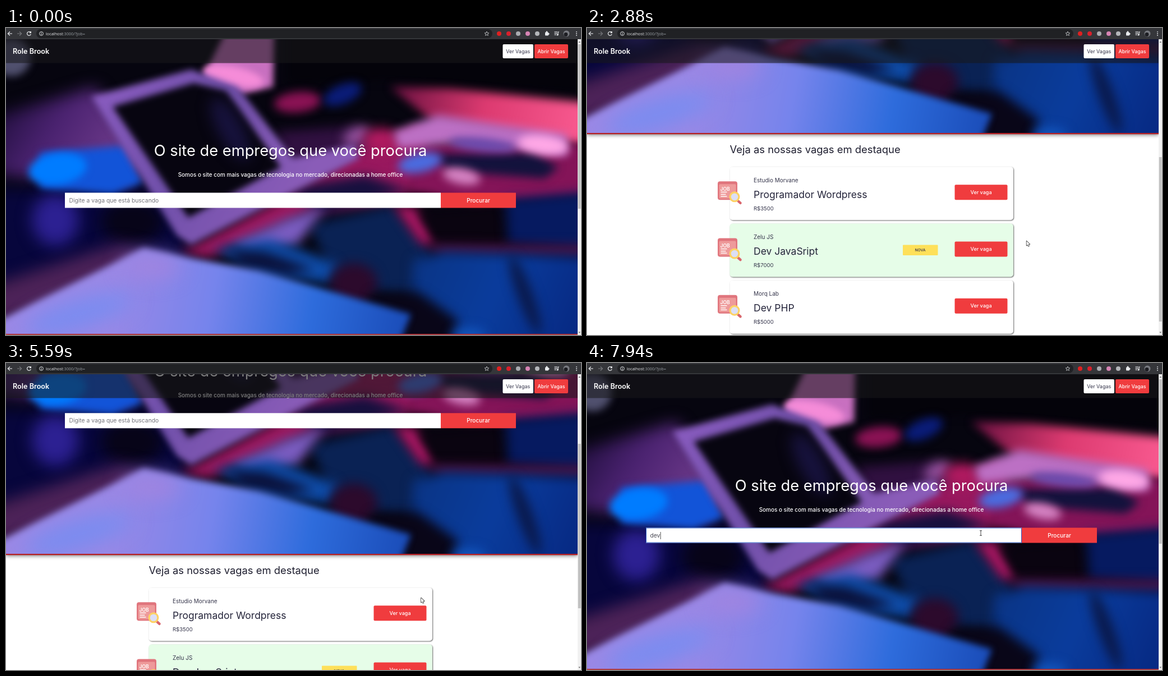
Animation, 1025 px wide and 547 px high, one loop 8000 ms. Source, as an HTML page with a canvas:

```html
<!DOCTYPE html>
<html lang="pt-BR">
<head>
<meta charset="utf-8">
<title>Vagas</title>
<style>
html, body { margin: 0; width: 100%; height: 100%; overflow: hidden; background: #fff; }
canvas { display: block; width: 1025px; height: 547px; }
</style>
</head>
<body>
<canvas id="stage" width="1025" height="547"></canvas>
<script>
const W = 1025, H = 547, LOOP = 8000, BAR = 20, PAGE_W = 1019, HERO_END = 544.5;
const RED = '#f03c3e', DARK_RED = [189, 26, 28], INK = '#24243a';
const SANS = 'Inter, sans-serif';
const ctx = document.getElementById('stage').getContext('2d');
const photo = paintPhoto();

// Pose tracks: [time, ...values]
const POINTER = [
  [70, 972, 508], [220, 925, 455], [460, 866, 400], [905, 866, 400],
  [1160, 856, 318], [1550, 842, 304], [1850, 842, 304], [2020, 822, 322],
  [2329, 783.5, 379.5], [3250, 783.5, 379.5], [3440, 735, 275], [3575, 716, 262],
  [3760, 735, 276], [4043, 780, 375], [4500, 875, 437], [4900, 740, 378],
  [4978, 684, 366], [5130, 690, 381], [5350, 740, 418.5], [5900, 740, 418.5],
  [6300, 742, 350], [6600, 724, 312], [6700, 724, 312], [6701, 716, 316],
  [7080, 716, 316], [7081, 720, 314.5], [7930, 720, 314.5], [7931, 702, 303]
];
const SCROLL = [
  [2420, 0], [2485, 70], [2563, 161.5], [2780, 161.5], [2797, 250],
  [2875, 358], [3095, 358], [3108, 385.5], [5280, 385.5], [5520, 250],
  [5757, 116], [5990, 40], [6150, 0]
];
const JOBS = [
  { firm: 'Estudio Morvane', title: 'Programador Wordpress', pay: 'R$3500', hover: [3430, 3780] },
  { firm: 'Zelu JS', title: 'Dev JavaSript', pay: 'R$7000', hover: [4940, 5120], fresh: true },
  { firm: 'Morq Lab', title: 'Dev PHP', pay: 'R$5000', hover: null }
];

function track(keys, t) {
  if (t <= keys[0][0]) return keys[0].slice(1);
  const i = keys.findIndex(k => k[0] > t);
  if (i < 0) return keys[keys.length - 1].slice(1);
  const a = keys[i - 1], b = keys[i], p = (t - a[0]) / (b[0] - a[0]);
  return a.slice(1).map((v, n) => v + (b[n + 1] - v) * p);
}

function rect(color, x, y, w, h, r = 0, c = ctx) {
  c.fillStyle = color;
  c.beginPath();
  c.roundRect(x, y, w, h, r);
  c.fill();
}

function disc(color, x, y, r) {
  ctx.fillStyle = color;
  ctx.beginPath();
  ctx.arc(x, y, r, 0, 7);
  ctx.fill();
}

function line(color, width, ...p) {
  ctx.strokeStyle = color;
  ctx.lineWidth = width;
  ctx.beginPath();
  for (let i = 0; i < p.length; i += 2) ctx.lineTo(p[i], p[i + 1]);
  ctx.stroke();
}

// y is the middle of the capitals
function text(str, x, y, size, color, weight = 400, align = 'left', family = SANS) {
  ctx.font = `${weight} ${size}px ${family}`;
  ctx.textAlign = align;
  ctx.fillStyle = color;
  ctx.fillText(str, x, y + size * 0.36);
  return ctx.measureText(str).width;
}

function paintPhoto() {
  const cv = document.createElement('canvas');
  cv.width = PAGE_W;
  cv.height = H;
  const c = cv.getContext('2d');
  const soft = n => { c.filter = `blur(${n}px)`; };
  const poly = (color, ...p) => {
    c.fillStyle = color;
    c.beginPath();
    for (let i = 0; i < p.length; i += 2) c.lineTo(p[i], p[i + 1]);
    c.fill();
  };
  const blob = (color, x, y, rx, ry, turn = 0) => {
    c.fillStyle = color;
    c.beginPath();
    c.ellipse(x, y, rx, ry, turn, 0, 7);
    c.fill();
  };
  const fade = (x0, y0, x1, y1, ...colors) => {
    const g = c.createLinearGradient(x0, y0, x1, y1);
    colors.forEach((k, i) => g.addColorStop(i / (colors.length - 1), k));
    return g;
  };
  c.fillStyle = '#06050f';
  c.fillRect(0, 0, PAGE_W, H);

  // left side
  soft(14);
  poly(fade(0, 100, 190, 220, '#1c0c38', '#4a2270', '#6a3888'), -30, 160, 160, 105, 240, 230, 220, 290, -30, 260);
  poly('#07063c', -30, 285, 300, 285, 330, 420, -30, 470);
  blob('#2c2092', 88, 342, 42, 46);
  blob('#070418', 225, 345, 55, 42);
  poly('#4c2258', -30, 460, 200, 385, 260, 400, 60, 510, -30, 530);
  soft(7);
  blob('#50506e', 10, 52, 34, 34);
  poly('#1254d8', 60, 222, 210, 210, 245, 275, 190, 296, 60, 285);
  blob('#007cff', 92, 251, 52, 28, -0.15);

  // middle ground
  soft(10);
  poly('#301040', 480, 185, 620, 175, 690, 240, 520, 270);
  poly('#98185e', 310, 400, 500, 300, 630, 215, 740, 175, 760, 260, 690, 315, 540, 330, 360, 410);
  poly('#16103e', 500, 285, 640, 262, 720, 290, 560, 335);
  poly('#0a2254', 540, 350, 690, 315, 760, 400, 730, 480, 590, 460);
  poly('#7a5cc0', 400, 385, 500, 340, 570, 318, 520, 385, 440, 405);
  poly('#0f4ca8', 370, 395, 470, 375, 590, 420, 580, 455, 470, 440);
  poly('#0a1038', 395, 395, 460, 398, 550, 430, 500, 440, 420, 425);
  blob('#2c0a2c', 620, 455, 42, 36);
  poly('#b31868', 690, 315, 730, 320, 770, 385, 740, 385);
  blob('#94529e', 625, 192, 26, 15, -0.5);
  blob('#b01a60', 668, 200, 32, 22);

  // phone
  soft(6);
  poly('#c870c0', 395, 0, 478, 0, 476, 105, 420, 118, 350, 90);
  blob('#f58cd8', 405, 86, 55, 17, 0.2);
  poly(fade(150, 120, 500, 330, '#8a5cc0', '#7050aa', '#8a5cb8'),
    152, 122, 330, 74, 412, 104, 512, 232, 620, 208, 630, 232, 330, 386, 305, 370);
  poly('#070510', 190, 140, 335, 98, 392, 112, 490, 248, 325, 338);
  soft(12);
  blob('#17123c', 400, 180, 22, 62, -0.5);

  // upper right
  soft(8);
  poly('#04030a', 500, 0, 1060, 0, 1060, 118, 690, 92, 500, 100);
  blob('#8a1254', 520, 132, 42, 18, -0.1);
  blob('#0a1c78', 600, 118, 36, 17, -0.4);
  poly(fade(690, 100, 1019, 170, '#6a1040', '#dc3a70', '#f7588e'),
    685, 105, 790, 108, 1060, 135, 1060, 215, 760, 166);
  poly('#841458', 720, 205, 1060, 205, 1060, 300, 840, 315, 720, 290);
  poly('#bc70c4', 690, 185, 770, 155, 1000, 190, 1000, 228, 800, 205, 700, 215);
  poly('#12123c', 760, 225, 940, 222, 985, 248, 960, 268, 790, 255);
  blob('#4a6ce0', 738, 240, 40, 17, -0.2);
  blob('#6a4aae', 850, 208, 60, 12, 0.1);
  blob('#ffa8e6', 957, 208, 45, 17, 0.12);
  blob('#d684c4', 812, 264, 34, 14, 0.2);

  // lower right
  soft(10);
  poly('#0a0410', 735, 325, 880, 315, 905, 385, 770, 390);
  poly('#061a60', 890, 305, 1060, 290, 1060, 400, 895, 385);
  poly('#521448', 750, 386, 1060, 388, 1060, 408, 770, 405);
  poly(fade(730, 400, 1019, 520, '#0a3484', '#0a3c9c', '#072a84'), 725, 415, 780, 398, 1060, 408, 1060, 590, 720, 590);
  blob('#0a1848', 925, 475, 13, 75, -0.35);
  poly('#090618', 650, 475, 735, 470, 805, 520, 790, 590, 660, 590);
  blob('#1458c0', 825, 548, 30, 12);

  // desk
  soft(6);
  poly(fade(200, 420, 720, 520, '#9a88e6', '#7684ec', '#2e6cdc', '#1a4cb8'),
    -30, 530, 245, 392, 330, 410, 450, 432, 722, 510, 690, 590, -30, 590);
  soft(18);
  blob('#7a8cf0', 130, 510, 100, 26, -0.3);
  blob('#a084e0', 260, 425, 50, 22);
  return cv;
}

function hoverAmount(span, t) {
  if (!span) return 0;
  const inP = Math.min(1, Math.max(0, (t - span[0]) / 170));
  const outP = Math.min(1, Math.max(0, (t - span[1]) / 170));
  return inP * inP * (1 - outP * outP);
}

function button(label, x, y, w, h, size, span, t, radius) {
  const p = hoverAmount(span, t);
  const [r, g, b] = [240, 60, 62].map((v, i) => v + (DARK_RED[i] - v) * p);
  rect(`rgb(${r},${g},${b})`, x, y, w, h, radius);
  if (span && t >= span[0] && t < span[1]) {
    ctx.strokeStyle = `rgb(${DARK_RED})`;
    ctx.lineWidth = 1;
    ctx.strokeRect(x + 0.5, y + 0.5, w - 1, h - 1);
  }
  text(label, x + w / 2, y + h / 2, size, '#fff', 500, 'center');
}

function searchBox(t) {
  rect('#fff', 105, 293.5, 670, 27);
  button('Procurar', 775, 293.5, 134, 27, 10.1, [1160, 2020], t, 0);
  const typed = 'dev'.slice(0, [7700, 7780, 7940].filter(k => t >= k).length);
  const end = typed
    ? 112.5 + text(typed, 112.5, 307, 10.3, '#4a4a55')
    : (text('Digite a vaga que está buscando', 112.5, 307, 10.35, '#75757c'), 112.5);
  if (t < 6600) return;
  ctx.strokeStyle = '#2a5cc8';
  ctx.lineWidth = 1;
  ctx.strokeRect(105.5, 294, 669, 26);
  if (t < 7090 || t >= 7700) rect('#222', end + 0.3, 301, 0.8, 13);
}

function jobIcon(x, y) {
  rect('#e0757d', x, y, 35, 33, 4);
  rect('#ee9a9a', x + 2.5, y + 5, 30, 25.5, 2);
  text('JOB', x + 4.5, y + 13.5, 8.6, '#fff', 600);
  [[19, 11], [23, 9], [26.5, 11]].forEach(([dy, w]) => rect('#fff', x + 5.5, y + dy - 0.7, w, 1.5));
  ctx.lineCap = 'round';
  line('#d9666c', 4.5, x + 36, y + 34.5, x + 40.5, y + 38.5);
  ctx.lineCap = 'butt';
  disc('#fdd264', x + 30, y + 27.5, 9.5);
  disc('#dcdff6', x + 30, y + 27.5, 6.3);
}

function shadow(color, blur, dx, dy) {
  ctx.shadowColor = color;
  ctx.shadowBlur = blur;
  ctx.shadowOffsetX = dx;
  ctx.shadowOffsetY = dy;
}

function jobCard(job, y, t) {
  ctx.save();
  shadow('rgba(0,0,0,.6)', 2, 1, 1);
  rect(job.fresh ? '#e6fde8' : '#fff', 254.5, y, 505.5, 95, 5);
  ctx.restore();
  jobIcon(233, y + 26);
  text(job.firm, 297, y + 24, 10, '#34344a');
  text(job.title, 297, y + 49, 17.5, INK);
  text(job.pay, 297, y + 74, 9.5, '#34344a');
  if (job.fresh) {
    rect('#fee05a', 563, y + 38, 62.5, 18.5, 1);
    text('NOVA', 594, y + 47.5, 6.7, '#34344a', 500, 'center');
  }
  button('Ver vaga', 655.5, y + 32, 94, 27, 9, job.hover, t, 2);
}

function page(scroll, t) {
  ctx.save();
  ctx.beginPath();
  ctx.rect(0, BAR, PAGE_W, H - BAR);
  ctx.clip();
  ctx.translate(0, -scroll);
  ctx.save();
  shadow('rgba(0,0,0,.55)', 7, 0, 2);
  rect('#b51f24', 0, BAR, PAGE_W, HERO_END + 2 - BAR);
  ctx.restore();
  ctx.drawImage(photo, 0, 0, PAGE_W, HERO_END, 0, 0, PAGE_W, HERO_END);
  text('O site de empregos que você procura', 507, 218.5, 27.3, '#fff', 400, 'center');
  text('Somos o site com mais vagas de tecnologia no mercado, direcionadas a home office',
    507, 261.5, 9.95, '#fff', 500, 'center');
  searchBox(t);
  text('Veja as nossas vagas em destaque', 254.5, 573.5, 18.4, '#1f1f30');
  JOBS.forEach((job, i) => jobCard(job, 604.5 + i * 101.2, t));
  ctx.restore();
}

function siteHeader() {
  rect('rgba(24,24,26,.56)', 0, BAR, PAGE_W, 42.5);
  text('Role Brook', 12, 41.5, 12.6, '#fff', 600);
  rect('#fff', 885.5, 29, 54.5, 25, 2);
  text('Ver Vagas', 912.7, 41.5, 9, '#34344a', 400, 'center');
  rect(RED, 942, 29, 60, 25, 2);
  text('Abrir Vagas', 972, 41.5, 8.8, '#fff', 500, 'center');
}

function scrollbar(scroll) {
  rect('#f1f1f1', PAGE_W, BAR, 6, H - BAR);
  rect('#c1c1c1', PAGE_W + 0.7, 29 + scroll * 0.563, 4.8, 293);
  ctx.fillStyle = '#606060';
  [[26, -1], [541.5, 1]].forEach(([y, d]) => {
    ctx.beginPath();
    ctx.moveTo(1020.5, y);
    ctx.lineTo(1024, y);
    ctx.lineTo(1022.2, y + 2.2 * d);
    ctx.fill();
  });
}

function arrowIcon(x, dir, color) {
  line(color, 1.1, x - 4 * dir, 10, x + 3.5 * dir, 10);
  line(color, 1.1, x, 6.5, x + 3.7 * dir, 10, x, 13.5);
}

function browserBar() {
  rect('#35363a', 0, 0, W, BAR);
  rect('#202124', 54, 2, 813, 16, 8);
  arrowIcon(7, -1, '#e8eaed');
  arrowIcon(24, 1, '#77797d');
  ctx.strokeStyle = '#e8eaed';
  ctx.lineWidth = 1.2;
  ctx.beginPath();
  ctx.arc(41, 10, 3.4, 0.3, 5.5);
  ctx.stroke();
  rect('#e8eaed', 42, 6.2, 3, 3);
  ctx.lineWidth = 0.9;
  ctx.beginPath();
  ctx.arc(63, 10, 3.4, 0, 7);
  ctx.stroke();
  rect('#e8eaed', 62.5, 9.4, 1, 2.8);
  rect('#e8eaed', 62.5, 7.7, 1, 1);
  const family = '"Open Sans", sans-serif';
  const w = text('localhost', 71, 10, 7.3, '#e8eaed', 400, 'left', family);
  text(':3000/?job=', 71 + w, 10, 7.3, '#9aa0a6', 400, 'left', family);

  ctx.beginPath();
  for (let i = 0; i < 10; i++) {
    const a = i * Math.PI / 5 - Math.PI / 2, r = i % 2 ? 1.8 : 4;
    ctx.lineTo(857 + r * Math.cos(a), 10.2 + r * Math.sin(a));
  }
  ctx.closePath();
  ctx.strokeStyle = '#d5d7da';
  ctx.lineWidth = 0.8;
  ctx.stroke();
  [[879, '#e02020'], [896, '#d8202c'], [913, '#a9abb0'], [930, '#d784b4'], [947, '#b4b6ba']]
    .forEach(([x, color]) => disc(color, x, 10, 4));
  rect('#e8eaed', 961, 7.5, 6, 6, 1);
  disc('#e8eaed', 964, 7, 1.4);
  disc('#e8eaed', 967.2, 10.5, 1.4);
  [7, 9.5, 12].forEach((y, i) => line('#e8eaed', 1.1, 977.5, y, i < 2 ? 983 : 981, y));
  line('#e8eaed', 1.1, 986, 7, 984.2, 7, 984.2, 12);
  disc('#e8eaed', 983.2, 12.2, 1.4);
  disc('#77797f', 999, 10, 5.5);
  disc('#1c1d22', 998, 11.5, 3.4);
  [6.8, 10, 13.2].forEach(y => disc('#e8eaed', 1017, y, 0.9));
}

function outlined(points) {
  ctx.beginPath();
  points.forEach(p => ctx.lineTo(...p));
  ctx.closePath();
  ctx.lineJoin = 'round';
  ctx.strokeStyle = '#111';
  ctx.lineWidth = 1.3;
  ctx.stroke();
  ctx.fillStyle = '#fff';
  ctx.fill();
}

function pointer(x, y, scroll, t) {
  const onButton = [[1160, 2020], JOBS[0].hover, [4900, 5120]].some(([a, b]) => t >= a && t < b);
  const py = y + scroll;
  const onInput = x > 105 && x < 775 && py > 293 && py < 321;
  ctx.save();
  ctx.translate(x, y);
  if (onButton) {
    outlined([[-0.8, 0], [0.8, 0], [1, 3.8], [4.8, 5], [5.6, 6.2], [4.8, 11], [0, 11], [-3, 6.6], [-2.4, 6], [-0.9, 7.2]]);
  } else if (onInput) {
    line('#333', 0.9, 0, -4.2, 0, 4.2);
    line('#333', 0.9, -2, -4.3, 2, -4.3);
    line('#333', 0.9, -2, 4.3, 2, 4.3);
  } else {
    outlined([[0, 0], [0, 8.2], [1.9, 6.5], [3.2, 9.4], [4.5, 8.8], [3.2, 6], [5.8, 5.8]]);
  }
  ctx.restore();
}

function draw(t) {
  const tick = 70 + 77.9 * Math.floor((t - 58) / 77.9);
  const [scroll] = track(SCROLL, tick);
  ctx.fillStyle = '#fff';
  ctx.fillRect(0, 0, W, H);
  page(scroll, t);
  siteHeader();
  scrollbar(scroll);
  browserBar();
  if (t >= 70) pointer(...track(POINTER, tick), scroll, t);
}

const start = performance.now();
function loop() {
  draw((performance.now() - start) % LOOP);
  requestAnimationFrame(loop);
}
loop();
</script>
</body>
</html>
```
